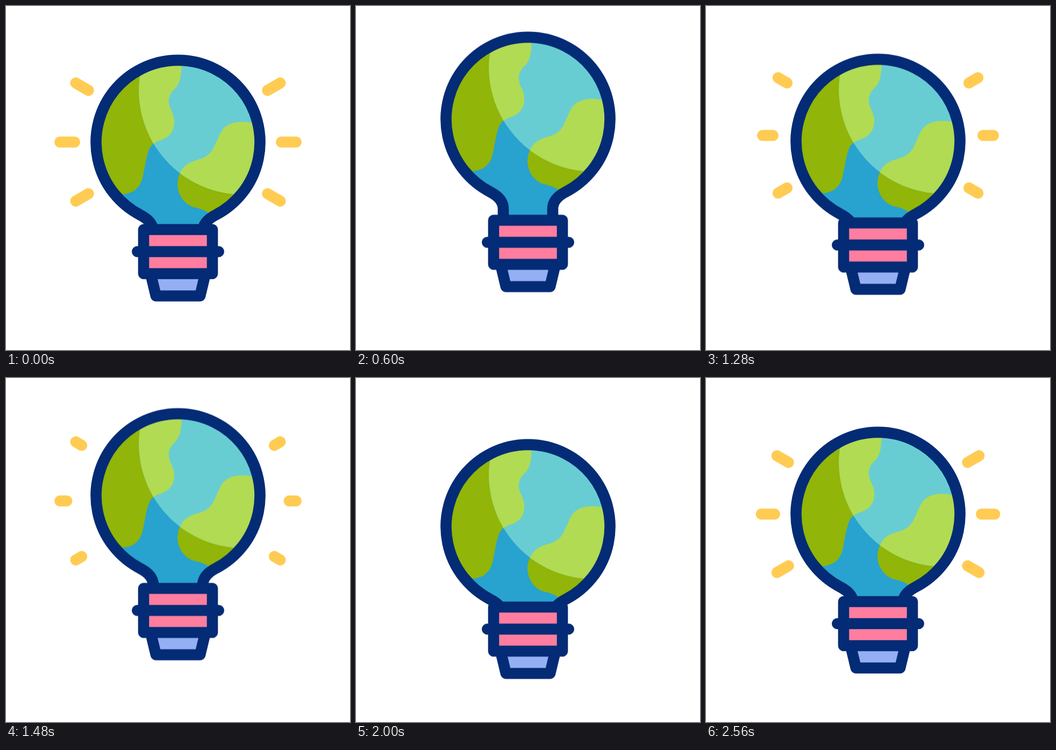
Recreate the animation shown at these times as an HTML page. Size 640 by 640 pixels, loop 2.6 s.

```html
<!DOCTYPE html>
<html lang="en">
<head>
<meta charset="utf-8">
<title>Earth bulb</title>
<style>
  html, body { margin: 0; width: 100%; height: 100%; overflow: hidden; background: #fff; }
  svg { display: block; width: 100%; height: 100%; }

  .line { fill: none; stroke: #042b75; stroke-width: 20.6; stroke-linecap: round; stroke-linejoin: round; }
  .dark { --sea: #28a2cf; --land: #91b508; }
  .light { --sea: #68cdd2; --land: #b1db53; }
  .sea { fill: var(--sea); }
  .land { fill: var(--land); }

  .globe, .base { animation: 2600ms cubic-bezier(.333, 0, .667, 1) infinite; }
  .globe { animation-name: globe; }
  .base { animation-name: base; }

  .rays {
    fill: none; stroke: #ffcb52; stroke-width: 20.6; stroke-linecap: round;
    animation: trim 2600ms linear infinite, blink 2600ms step-end infinite;
  }

  @keyframes globe {
    0%, 1.15% { transform: translateY(0); }
    20.27% { transform: translateY(-49px); }
    38.46% { transform: translateY(45px); }
    57.88% { transform: translateY(-35px); }
    74.04% { transform: translateY(25px); }
    90.96%, 100% { transform: translateY(0); }
  }
  @keyframes base {
    0% { transform: translateY(0); }
    18.46% { transform: translateY(-25.5px); }
    36.92% { transform: translateY(25.5px); }
    55.38% { transform: translateY(-25.5px); }
    72.31% { transform: translateY(12.5px); }
    89.23%, 100% { transform: translateY(0); }
  }
  /* dash = visible length, offset = trimmed inner end */
  @keyframes trim {
    0% { stroke-dasharray: 27.4px 99px; stroke-dashoffset: 0px; }
    18.27% { stroke-dasharray: 0px 99px; stroke-dashoffset: -27.4px; }
    35.42% { stroke-dasharray: 0px 99px; stroke-dashoffset: 0px; }
    47.23% { stroke-dasharray: 19.2px 99px; stroke-dashoffset: 0px; }
    52.31% { stroke-dasharray: 19.8px 99px; stroke-dashoffset: -7.6px; }
    65.54% { stroke-dasharray: 0px 99px; stroke-dashoffset: -27.4px; }
    83.85% { stroke-dasharray: 0px 99px; stroke-dashoffset: 0px; }
    100% { stroke-dasharray: 27.4px 99px; stroke-dashoffset: 0px; }
  }
  @keyframes blink {
    0% { opacity: 1; }
    18.27% { opacity: 0; }
    35.42% { opacity: 1; }
    65.54% { opacity: 0; }
    83.85%, 100% { opacity: 1; }
  }
</style>
</head>
<body>
<svg viewBox="0 0 640 640">
  <defs>
    <path id="bulb" d="M274 436V420C274 407 265 396.5 249.7 388.7A152.5 152.5 0 1 1 390.3 388.7C375 396.5 366 407 366 420V436"/>
    <clipPath id="inside"><use href="#bulb"/></clipPath>
    <clipPath id="shine"><circle cx="441" cy="157" r="193.7"/></clipPath>
    <g id="earth">
      <path class="sea" d="M150 90H490V440H150Z"/>
      <path class="land" d="M327 98C327 125 325 142 316 152C304 162 299 175 306 191C311 202 314 209 313 219C312 235 302 244 292 248C281 252 271 255 266 267C260 283 258 303 254 320C249 339 236 349 217 350H150V90Z"/>
      <path class="land" d="M470 220C440 212 416 214 403 230C394 242 391 260 381 272C370 285 356 285 343 291C328 298 319 314 319 333C320 354 334 371 352 375C362 377 370 380 377 385L400 400H490Z"/>
    </g>
    <path id="ray" d="M192.3 0H219.7"/>
    <g id="fan">
      <use href="#ray" transform="rotate(-30)"/>
      <use href="#ray"/>
      <use href="#ray" transform="rotate(30)"/>
    </g>
  </defs>

  <g class="globe">
    <g clip-path="url(#inside)">
      <use class="dark" href="#earth"/>
      <g clip-path="url(#shine)"><use class="light" href="#earth"/></g>
    </g>
    <use class="line" href="#bulb" style="stroke-linecap:butt"/>
  </g>

  <g class="base">
    <path d="M269 498L279 539.5H361L371 498Z" fill="#95aff4"/>
    <path class="line" d="M269 498L279 539.5H361L371 498"/>
    <path d="M256 416H384V498H256Z" fill="#ff7ea0"/>
    <path class="line" d="M256 416H384V498H256ZM244.3 457H395.7"/>
    <g transform="translate(320 253.2)">
      <g class="rays">
        <use href="#fan"/>
        <use href="#fan" transform="scale(-1 1)"/>
      </g>
    </g>
  </g>
</svg>
</body>
</html>
```
